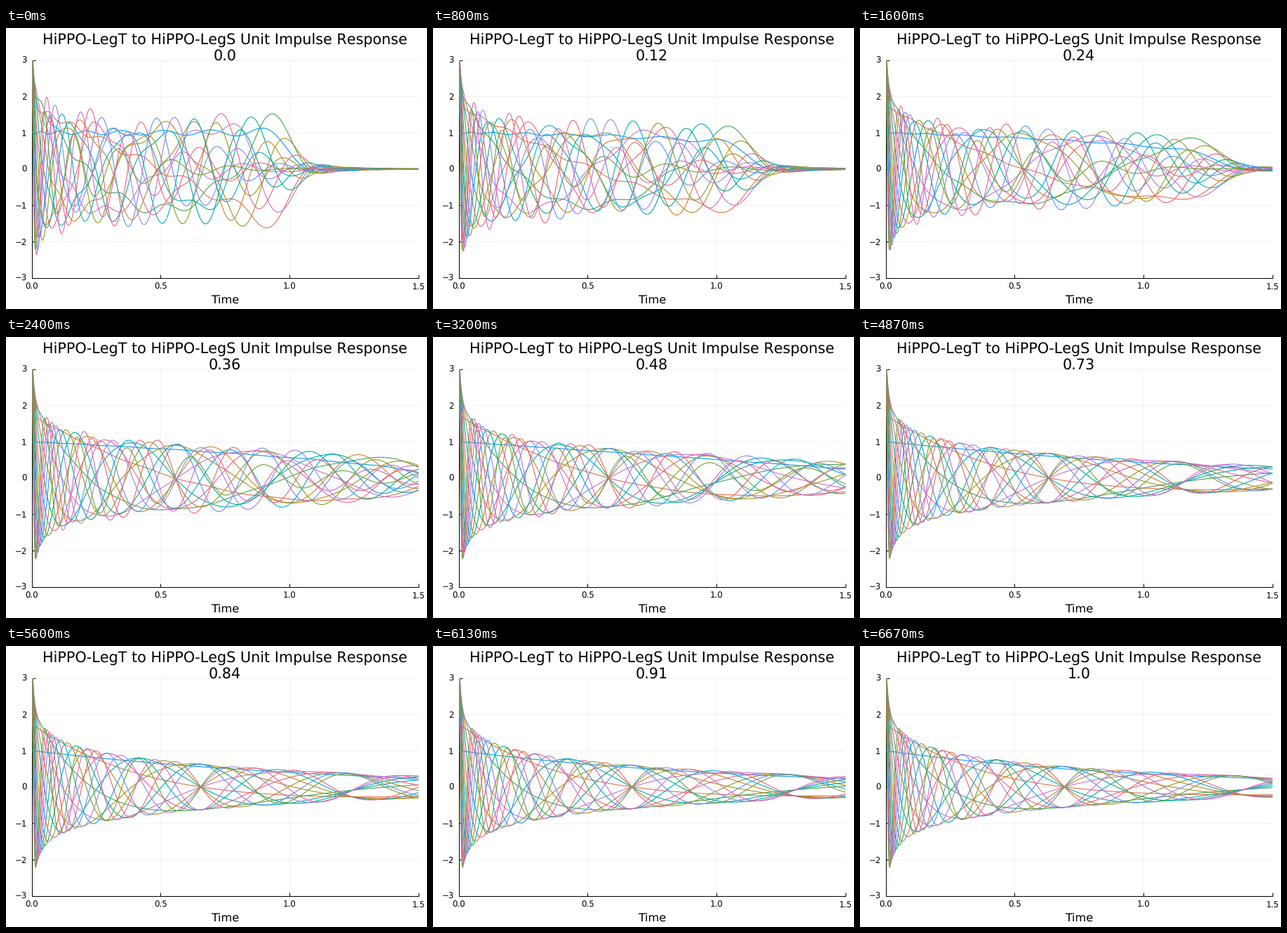
Write a matplotlib script that moves like this. It is 600 px wide and 400 px high and loops after 6.74 s.

```python
import numpy as np
import matplotlib.pyplot as plt
from matplotlib.animation import FuncAnimation
from numpy.polynomial import legendre

W, H, DPI = 600, 400, 100
LEFT, RIGHT, TOP, BOTTOM = 36.7, 587.7, 45.7, 355.7
MID = (LEFT + RIGHT) / 2
FRAMES, INTERVAL = 101, 66.66    # 15 frames per second
N, STEPS, T_END = 16, 1500, 1.5

COLORS = [
    "#009AFA", "#E36F47", "#3EA44E", "#C371D2", "#AC8E18", "#00AAAE",
    "#ED5E93", "#C68225", "#00A98D", "#8E971E", "#00A9CC", "#9B7FE9",
    "#618DF6", "#F06073", "#DD65B6", "#6C9F33",
]

plt.rcParams.update({
    "font.family": "DejaVu Sans",
    "text.hinting": "none",
    "text.kerning_factor": 6,    # plain advance widths, no kerning
})


def px(size):
    """Pixels to points."""
    return size * 72 / DPI


def state_matrices(alphas):
    """Legendre memory whose past is warped by dx/dt = -x**alpha."""
    s, w = legendre.leggauss(160)
    s, w = (s + 1) / 2, w / 2
    x, w = s**4, 4 * s**3 * w      # x = s^4 tames x**alpha near zero
    z = 2 * x - 1
    scale = np.sqrt(2 * np.arange(N) + 1)
    p = legendre.legvander(z, N - 1) * scale
    dp = np.stack([2 * legendre.Legendre.basis(n).deriv()(z)
                   for n in range(N)], axis=1) * scale
    weight = w * x ** alphas[:, None]
    a = np.einsum("xn,fx,xk->fnk", p, weight, dp, optimize=True)
    return a - np.outer(scale, scale), scale


def impulse_responses(alphas):
    a, b = state_matrices(alphas)
    ha = a * (T_END / STEPS)
    step = np.broadcast_to(np.eye(N), a.shape).copy()
    term = step.copy()
    for j in range(1, 18):
        term = term @ ha / j
        step += term
    out = np.empty((STEPS + 1, len(alphas), N))
    out[0] = b
    for i in range(STEPS):
        out[i + 1] = (step @ out[i][:, :, None])[:, :, 0]
    return out


alphas = np.arange(FRAMES) / (FRAMES - 1)
times = np.linspace(0, T_END, STEPS + 1)
curves = impulse_responses(alphas)

fig = plt.figure(figsize=(W / DPI, H / DPI), dpi=DPI, facecolor="white")
ax = fig.add_axes([LEFT / W, 1 - BOTTOM / H,
                   (RIGHT - LEFT) / W, (BOTTOM - TOP) / H])
ax.set(xlim=(0, T_END), ylim=(-3, 3))
xticks, yticks = np.arange(0, 1.6, 0.5), np.arange(-3, 4)
ax.set_xticks(xticks)
ax.set_yticks(yticks)
ax.set_axisbelow(True)
ax.tick_params(direction="in", length=px(5), width=px(1),
               labelbottom=False, labelleft=False)
ax.grid(color="black", alpha=0.1, linewidth=px(0.5))
for side in ("top", "right"):
    ax.spines[side].set_visible(False)
for side in ("left", "bottom"):
    ax.spines[side].set(linewidth=px(1), zorder=1)


def label(x, y, text, size, ha="center"):
    return fig.text(x / W, 1 - y / H, text, fontsize=px(size),
                    ha=ha, va="baseline", color="black")


for v in xticks:
    label(LEFT + v / T_END * (RIGHT - LEFT), 371.5, f"{v:.1f}", 11.8)
for v in yticks:
    y = TOP + (3 - v) / 6 * (BOTTOM - TOP)
    label(29.6, y + 4.6, str(v).replace("-", "\u2212"), 11.8, "right")
label(MID, 392, "Time", 16.25)
label(MID, 23.7, "HiPPO-LegT to HiPPO-LegS Unit Impulse Response", 20.75)
counter = label(MID, 46, "0.0", 20.75)

lines = [ax.plot([], [], color=c, linewidth=px(1.1))[0] for c in COLORS]


def draw(i):
    for n, line in enumerate(lines):
        line.set_data(times, curves[:, i, n])
    counter.set_text(str(i / 100))
    return [*lines, counter]


anim = FuncAnimation(fig, draw, frames=FRAMES, interval=INTERVAL,
                     init_func=lambda: draw(0), repeat=True, repeat_delay=0)
plt.show()
```
